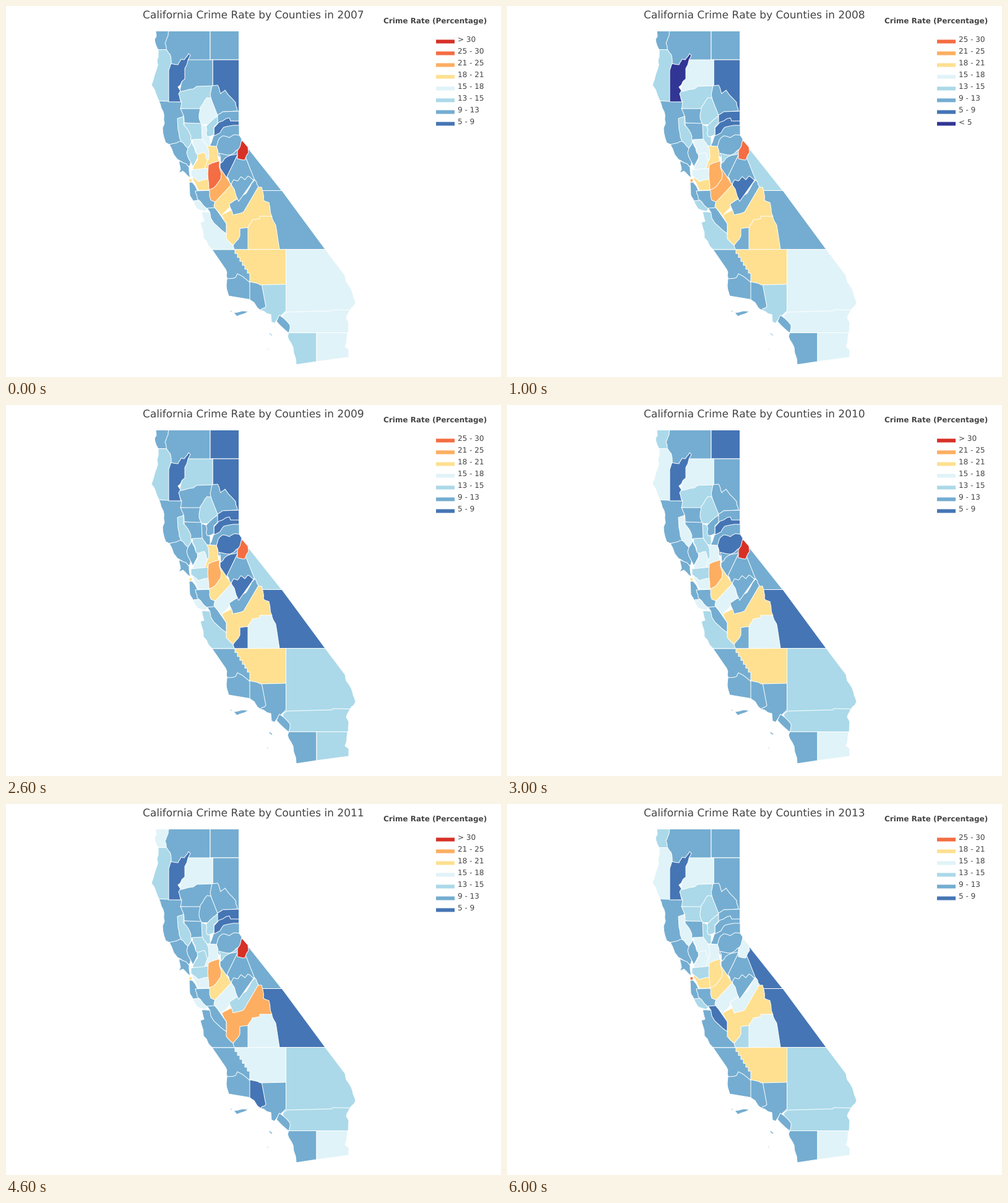
Recreate the animation shown at these times as a matplotlib script. Size 800x600 px, loop 7 s.

```python
import math
import random

import matplotlib.pyplot as plt
from matplotlib.animation import FuncAnimation
from matplotlib.collections import PolyCollection
from matplotlib.patches import Rectangle

W, H, DPI = 800, 600, 100
PX = 72 / DPI
INK = "#444444"
YEARS = range(2007, 2014)
STEADY = "2" * len(YEARS)

# Rate classes from lowest to highest
CLASSES = [
    ("< 5", "#313695"), ("5 - 9", "#4575b4"), ("9 - 13", "#74add1"),
    ("13 - 15", "#abd9e9"), ("15 - 18", "#e0f3f8"), ("18 - 21", "#fee090"),
    ("21 - 25", "#fdae61"), ("25 - 30", "#f46d43"), ("> 30", "#d73027"),
]

plt.rcParams["text.hinting"] = "none"
plt.rcParams["text.hinting_factor"] = 1
rng = random.Random(7)
shapes, rates = [], []


def rough(corners):
    """Bend natural borders a little; surveyed lines and short edges stay straight."""
    path = []
    for (x0, y0), (x1, y1) in zip(corners, corners[1:] + corners[:1]):
        dx, dy = x1 - x0, y1 - y0
        path.append((x0, y0))
        if 8 < math.hypot(dx, dy) < 30 and min(abs(dx), abs(dy)) > 1.5:
            for t in (0.35, 0.7):
                k = rng.uniform(-0.06, 0.06)
                path.append((x0 + t * dx - k * dy, y0 + t * dy + k * dx))
    return path


def county(*xy, levels=STEADY):
    """Add an outline from key points, with one class digit per year."""
    shapes.append(rough(list(zip(xy[::2], xy[1::2]))))
    rates.append([int(c) for c in levels])


def stairs(x0, y0, x1, y1, steps):
    """Staircase border that goes down, then across, at each step."""
    dx, dy = (x1 - x0) / steps, (y1 - y0) / steps
    for n in range(steps):
        yield from (x0 + n * dx, y0 + (n + 1) * dy)
        yield from (x0 + (n + 1) * dx, y0 + (n + 1) * dy)


# Later outlines lie on top, so earlier ones may run beneath their neighbours.

# North
county(257, 40.5, 330, 40.5, 330, 87, 306, 94, 268, 100, 256, 68)
county(330, 40.5, 376.5, 40.5, 376.5, 87, 330, 87, levels="2211222")
county(242, 40.5, 263, 40.5, 261, 50, 257, 60, 260, 73, 246, 71, 240, 54, 243, 49,
       levels="2223433")
county(246, 70.5, 259, 70.5, 265, 78, 267, 88, 268, 155, 247, 153.5, 235, 128,
       243, 103, 246, 82, levels="3334344")
county(334, 87, 376.5, 87, 376.5, 171, 350, 171, 334, 140, levels="1112222")
county(292, 87, 334, 87, 334, 134, 280, 140, levels="2434454")
county(247, 153.5, 286, 155, 290, 180, 288, 224, 264, 224, 258, 221, 253, 197,
       256, 190, 254, 171)
county(277, 139, 303, 134, 308, 130, 336, 129, 338, 150, 325, 168, 282, 166,
       284, 156, levels="3323233")
county(263, 155, 263, 104, 267, 93, 278, 95, 283, 86, 288, 87, 295, 77, 298, 80,
       289, 101, 289, 118, 278, 131, 282, 137, 279, 142, 283, 155, levels="1011111")
county(333, 129, 342, 128, 347, 142, 354, 136, 371, 156, 374, 170, 352, 171,
       338, 180, 330, 143)
county(282, 166, 318, 166, 318, 192, 288, 189, 286, 175, levels="2222223")
county(288, 189, 318, 190, 319, 216, 296, 217, 288, 206, levels="3222222")
county(264, 224, 280, 219, 292, 219, 300, 250, 296, 260, 277, 248)
county(287, 178, 287, 192, 297, 206, 300, 220, 294, 230, 283, 219, 278, 199,
       277, 182, levels="3334344")
county(342, 176, 350, 171, 376.5, 170, 376.5, 190, 338, 196, levels="2112122")
county(331, 149, 342, 177, 327, 193, 316, 191, 312, 181, 314, 164, 325, 148,
       levels="4333223")
county(336, 208, 350, 192, 377, 190, 377, 212, 345, 228, 328, 227)
county(336, 210, 336, 197, 344, 188, 361, 181, 363, 186, 376.5, 186, 376.5, 193,
       352, 196, 346, 205, levels="1111122")
county(342, 178, 342, 189, 336, 196, 336, 208, 323, 212, 323, 195, levels="3322333")
county(340, 228, 345, 214, 350, 210, 361, 213, 369, 208, 377, 209, 381, 215,
       380, 240, 344, 244, levels="2211212")
county(300, 219, 306, 235, 312, 239, 302, 260, 292, 237, 294, 230, levels="3222222")
county(301, 216, 320, 215, 330, 235, 330, 254, 318, 243, 307, 238, levels="4433334")
county(316, 192, 323, 194, 325, 211, 330, 212, 330, 226, 325, 227, 317, 214,
       levels="4323333")
county(309, 240, 321, 237, 326, 250, 324, 266, 302, 266, 302, 261, 310, 248,
       levels="5444344")
county(325, 226, 340, 227, 345, 253, 326, 265, 320, 266, 328, 246, levels="5554444")

# Bay Area
county(280, 250, 291, 255, 296, 261, 298, 278, 286, 267, 279, 270, 282, 264)
county(296, 285, 301, 285, 312, 304, 312, 314, 302, 316, 297, 306)
county(302, 315, 314, 313, 326, 328, 322, 332, 309, 328, levels="4344443")
county(301, 274, 329, 277, 331, 298, 311, 298, 302, 281, levels="5544455")
county(299, 265, 330, 262, 328, 280, 311, 284, 299, 274, levels="4433333")
county(296, 280, 300, 279, 301, 284, 296, 285, levels="5655567")
county(306, 299, 334, 298, 341, 318, 340, 327, 325, 328, 309, 312)

# Eastern slope and central valley
county(388, 226, 446, 299, 410, 299, 392, 268, 384, 250, levels="2332221")
county(412, 298.5, 446, 298.5, 516, 393.5, 440, 394.5, 420, 330, levels="2211121")
county(316, 333, 335, 335, 372, 386, 370, 394, 333, 394, 319, 375, 314, 350, 320, 348,
       levels="4333222")
county(400, 293, 413, 293, 416, 314, 425, 318, 430, 341, 412, 350, 382, 371,
       367, 387, 356, 376, 356, 352, 348, 338, 380, 322, levels="5555665")
county(325, 327, 338, 326, 356, 352, 356, 368, 336, 351, levels="2222221")
county(378, 360, 394, 358, 394, 394, 369, 394, 367, 387, 378, 372, levels="2212223")
county(391, 394, 391, 358, 398, 346, 410, 344, 410, 340, 429, 340, 437, 361,
       442, 394, levels="5544444")
county(360, 320, 388, 303, 402, 281, 408, 292, 384, 333, 367, 338, levels="2222344")
county(336, 324, 339, 312, 352, 292, 366, 287, 374, 312, 361, 320, 361, 326,
       348, 340, levels="5544454")
county(364, 289, 366, 276, 392, 270, 400, 282, 376, 316, levels="2112222")
county(344, 238, 362, 241, 377, 231, 377, 241, 348, 258, levels="2322322")
county(346, 255, 357, 244, 375, 239, 357, 278, 346, 266, levels="1212222")
county(346, 262, 364, 289, 338, 317, 331, 314, 328, 296, levels="6655555")
county(357, 276, 374, 241, 387, 244, 402, 282, 391, 275, 386, 281, 380, 276,
       374, 283, 368, 281, 364, 289)
county(381, 217, 391, 228, 392, 237, 386, 249, 374, 247, 374, 234, 378, 228,
       levels="8778854")
county(327, 257, 345, 250.5, 347, 280, 338, 292, 328, 297.5, 326, 272, levels="7666665")

# South
county(333, 394, 372, 394, 396, 424, 396, 448, 358, 442, 355, 426)
county(357, 441, 371, 439, 374, 433, 394, 447, 396, 475, 360, 469, 356, 452)
county(394, 444, 416, 448, 422, 488, 414, 494, 394, 475, levels="2222122")
county(452.5, 393.5, 516, 393.5, 548, 436, 550, 446, 560, 464, 565, 480, 556, 493,
       448, 500, levels="4433343")
county(413, 449, 452.5, 449, 452.5, 493, 434, 513, 429, 511, 428, 499, 411, 492,
       420, 486, levels="3322222")
county(447, 500, 454, 495, 527, 493, 528, 491, 556, 491.5, 550, 505, 554, 513,
       553, 529, 455, 529, levels="4433333")
county(437, 510, 442, 500, 459, 516, 457, 529)
county(457, 528.5, 502, 528.5, 502, 575, 469, 580, 464, 552, 455, 534,
       levels="3222222")
county(502, 528.5, 552, 528.5, 548, 551, 554, 556, 554, 568, 502, 575,
       levels="4434444")
county(*stairs(370, 394, 394, 432, 6), 394, 446, 411, 451, 452.5, 450, 452.5, 393.5,
       370, 394, levels="5555455")

# Islands
county(362, 492, 367, 494, 363, 495)
county(368, 496, 383, 493, 392, 494, 373, 502)
county(390, 537, 394, 541, 392, 538, levels="3322222")
county(420, 526, 430, 531, 431, 536, 425, 530, levels="3322222")
county(421, 550, 429, 565, 422, 555, levels="3322222")

fig = plt.figure(figsize=(W / DPI, H / DPI), dpi=DPI, facecolor="white")
ax = fig.add_axes([0, 0, 1, 1])
ax.set(xlim=(0, W), ylim=(H, 0))
ax.axis("off")


def label(x, y, size, **style):
    return ax.text(x, y, "", size=size * PX, color=INK, va="baseline",
                   family="DejaVu Sans", **style)


land = ax.add_collection(PolyCollection(
    shapes, edgecolors="white", linewidths=PX, joinstyle="round", snap=False))
title = label(400, 20, 17, ha="center")
label(610, 27, 12, weight="bold").set_text("Crime Rate (Percentage)")

keys = []
for row in range(8):
    y = 54.5 + 19 * row
    swatch = ax.add_patch(Rectangle((695, y), 30, 6, linewidth=0, snap=False))
    keys.append((swatch, label(730, y + 4.7, 12)))


def update(i):
    levels = [r[i] for r in rates]
    land.set_facecolor([CLASSES[k][1] for k in levels])
    title.set_text(f"California Crime Rate by Counties in {YEARS[i]}")
    shown = sorted(set(levels), reverse=True)
    for row, (swatch, text) in enumerate(keys):
        used = row < len(shown)
        swatch.set_visible(used)
        text.set_visible(used)
        if used:
            name, color = CLASSES[shown[row]]
            swatch.set_facecolor(color)
            text.set_text(name)
    return [land, title]


anim = FuncAnimation(fig, update, frames=len(YEARS), interval=1000,
                     init_func=lambda: update(0), repeat=True, repeat_delay=0)

plt.show()
```
